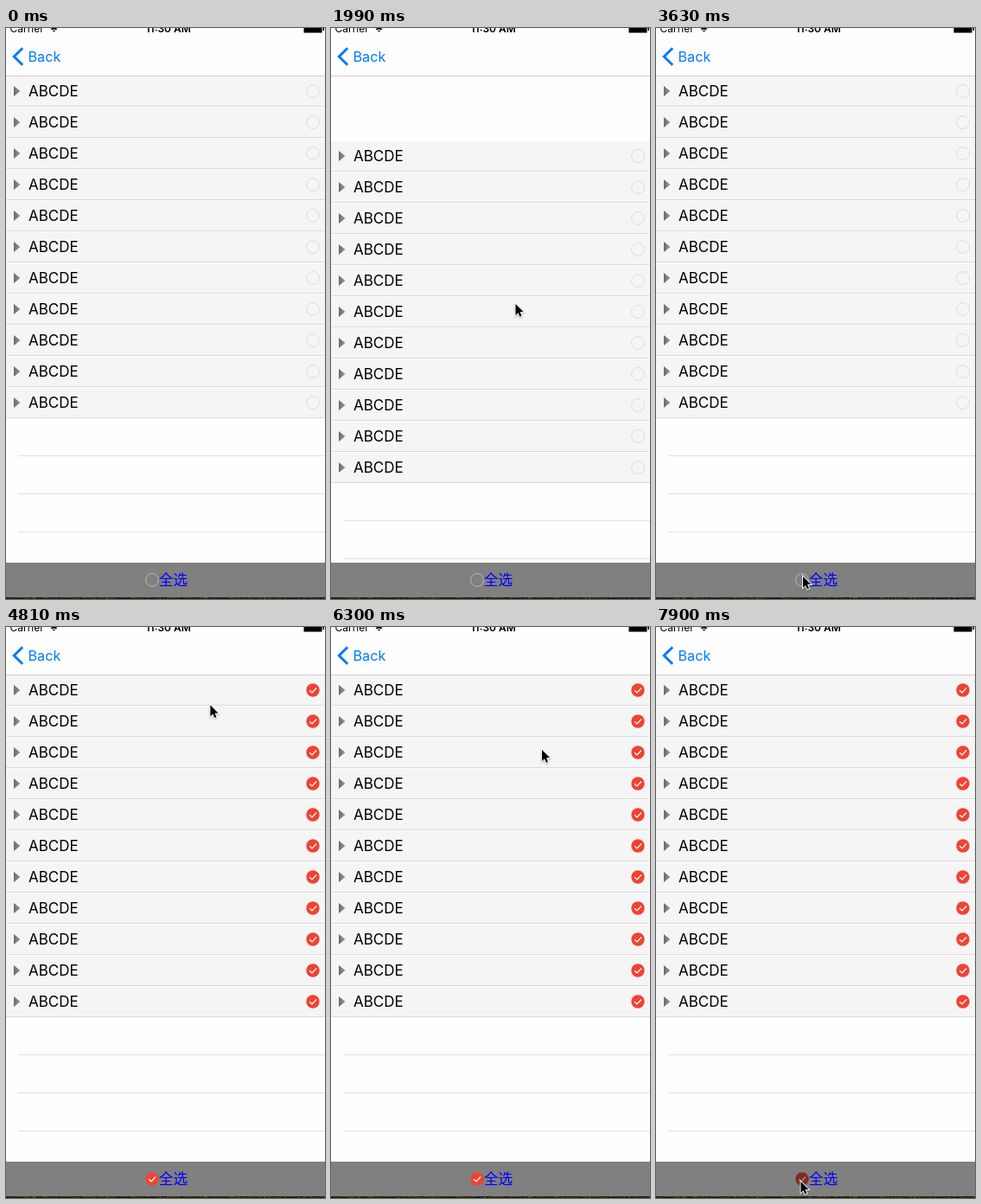
An HTML page with a canvas that plays this animation: 369x660 px, repeating every 8 s.

```html
<!DOCTYPE html>
<html lang="en">
<head>
<meta charset="utf-8">
<title>Select all list</title>
<style>
html, body { margin: 0; width: 100%; height: 100%; overflow: hidden; background: #fff; }
canvas { display: block; width: 369px; height: 660px; }
</style>
</head>
<body>
<canvas id="stage"></canvas>
<script>
const W = 369, H = 660, LOOP = 8000;
const NAV = 55, BAR = 618, ROW = 36, CELL = 44, SECTIONS = 11, CELLS = 3;
const SANS = 'Inter, "Liberation Sans", sans-serif';

// Timeline in ms; pictures are held for one beat.
const START = 1090, BEAT = 148;
const DRAG = 1450, DRAG_TIME = 525, RELEASE = 2100;
const PRESS = 3900, SELECT = 4040, PRESS_AGAIN = 7890;
const TAP = 5080, TAP_GAP = 700, OPEN_TIME = 430, TAPS = 3;

const canvas = document.getElementById('stage');
const ctx = canvas.getContext('2d');
const ratio = window.devicePixelRatio || 1;
canvas.width = W * ratio;
canvas.height = H * ratio;

const smooth = p => p * p * (3 - 2 * p);
const progress = (t, start, time) => smooth(Math.min(1, Math.max(0, (t - start) / time)));
const hold = t => t < START ? 0 : t - (t - START) % BEAT;
const tapTime = i => TAP + TAP_GAP * i;

function isOpen(section, t) {
  const since = t - tapTime(section);
  return section < TAPS && since >= 0 && since < OPEN_TIME;
}

// Each move eases the pointer from wherever it is to a new point.
const moves = [];
const move = (start, time, x, y) => moves.push({ start, time, x, y });
move(START, 350, 226, 165);
move(DRAG, DRAG_TIME, 213.5, 319);
move(2130, 430, 202, 348);
move(2580, 600, 199, 567);
move(3180, 430, 170, 634);
for (let i = 0; i < TAPS; i++) {
  const time = i ? 150 : 520;
  move(tapTime(i) - 260 - time, time, 237 + 3.5 * i, 85 + 28.5 * i);
}
move(tapTime(TAPS - 1) + OPEN_TIME, 830, 167.5, 641);

function pointerAt(t) {
  let x = 330, y = 205;
  for (const m of moves) {
    const p = progress(t, m.start, m.time);
    x += (m.x - x) * p;
    y += (m.y - y) * p;
  }
  return [x, y];
}

// Rubber-band pull followed by a critically damped return.
function pullAt(t) {
  if (t < RELEASE) return 75 * progress(t, DRAG, DRAG_TIME);
  const s = 10.9 * (t - RELEASE) / 1000;
  const pull = 75 * Math.exp(-s) * (1 + s);
  return pull < 0.25 ? 0 : pull;
}

function rect(x, y, w, h, color) {
  ctx.fillStyle = color;
  ctx.fillRect(x, y, w, h);
}

function shape(points, close) {
  ctx.beginPath();
  points.forEach(([x, y]) => ctx.lineTo(x, y));
  if (close) ctx.closePath();
}

function stroke(color, width) {
  ctx.strokeStyle = color;
  ctx.lineWidth = width;
  ctx.stroke();
}

function text(str, x, y, font, color) {
  ctx.font = font;
  ctx.fillStyle = color;
  ctx.fillText(str, x, y);
}

function checkbox(x, y, checked, ring, pressed) {
  ctx.beginPath();
  ctx.arc(x, y, checked ? 7.7 : 7.4, 0, 7);
  if (checked) {
    ctx.fillStyle = pressed ? '#822b22' : '#f14232';
    ctx.fill();
    shape([[x - 3.8, y + 0.2], [x - 1, y + 2.9], [x + 4.1, y - 2.5]]);
    stroke(pressed ? '#a89490' : '#fff', 1.3);
  } else {
    stroke(pressed ? '#606060' : ring, 0.9);
  }
}

function disclosure(y, open) {
  ctx.save();
  ctx.translate(12.5, y);
  if (open) ctx.rotate(Math.PI / 2);
  shape([[-3.5, -6], [4, 0], [-3.5, 6]], true);
  const shade = ctx.createLinearGradient(-4, 0, 4, 0);
  shade.addColorStop(0, '#676767');
  shade.addColorStop(1, '#999');
  ctx.fillStyle = shade;
  ctx.fill();
  ctx.restore();
}

function drawTable(t) {
  let y = NAV + pullAt(t);
  const emptyCell = () => {
    rect(14, y + CELL - 1, W - 14, 1, '#e1e1e3');
    y += CELL;
  };
  for (let i = 0; i < SECTIONS; i++) {
    const open = isOpen(i, t);
    rect(0, y + 1, W, ROW - 1, '#f5f5f5');
    rect(0, y + ROW - 1, W, 1, '#d9d9d9');
    disclosure(y + 18, open);
    text('ABCDE', 26, y + 24, '17px ' + SANS, '#000');
    checkbox(355, y + 18, t >= SELECT, '#d8d8d8');
    y += ROW;
    if (open) for (let n = 0; n < CELLS; n++) emptyCell();
  }
  while (y < BAR) emptyCell();
}

function drawNav() {
  rect(0, 0, W, NAV, '#fefefe');
  rect(0, NAV, W, 1, '#cfcfd1');
  text('Carrier', 4.5, 5, '12px ' + SANS, '#000');
  text('11:30 AM', 161.5, 5, '600 12px ' + SANS, '#000');
  for (const r of [1, 4, 7]) {
    ctx.beginPath();
    ctx.arc(55.5, 4.5, r, -Math.PI * 0.77, -Math.PI * 0.23);
    stroke('#000', 1.8);
  }
  rect(344.5, 0, 21, 5.5, '#000');
  rect(366.5, 0, 1.5, 3, '#000');
  shape([[19.2, 23.2], [9.3, 33], [19.2, 42.8]]);
  stroke('#007aff', 3);
  text('Back', 25.5, 39, '16.2px ' + SANS, '#007aff');
}

function drawToolbar(t) {
  const pressed = t >= PRESS && t < SELECT || t >= PRESS_AGAIN;
  rect(0, BAR, W, 40, '#808080');
  let seed = 11;
  const random = () => (seed = seed * 16807 % 2147483647) / 2147483647;
  for (let x = 0; x < W; x += 2)
    for (let y = BAR + 40; y < H; y++) {
      const v = random() * random() * 80;
      rect(x, y, 2, 1, `rgb(${20 + v}, ${23 + v}, ${12 + v * 0.3})`);
    }
  checkbox(169, 638, t >= SELECT, '#bcbcbc', pressed);
  text('全选', 176.8, 644, '16.7px "Noto Sans CJK SC", "Noto Sans CJK", sans-serif', '#0000ff');
}

function drawPointer([x, y]) {
  ctx.save();
  ctx.translate(x, y);
  ctx.scale(0.86, 0.86);
  shape([[0, 0], [0, 15], [3.5, 11.8], [5.8, 17.2], [8.2, 16.1], [5.9, 10.8], [10.6, 10.6]], true);
  ctx.shadowColor = 'rgba(0,0,0,.3)';
  ctx.shadowBlur = 2 * ratio;
  ctx.shadowOffsetY = ratio;
  stroke('#fff', 2.2);
  ctx.shadowColor = 'transparent';
  ctx.fillStyle = '#000';
  ctx.fill();
  ctx.restore();
}

function draw(now) {
  const t = hold(now % LOOP);
  ctx.setTransform(ratio, 0, 0, ratio, 0, 0);
  rect(0, 0, W, H, '#fefefe');
  drawTable(t);
  drawNav();
  drawToolbar(t);
  if (t >= START) drawPointer(pointerAt(t));
}

const begin = performance.now();
function loop() {
  draw(performance.now() - begin);
  requestAnimationFrame(loop);
}
loop();
</script>
</body>
</html>
```
